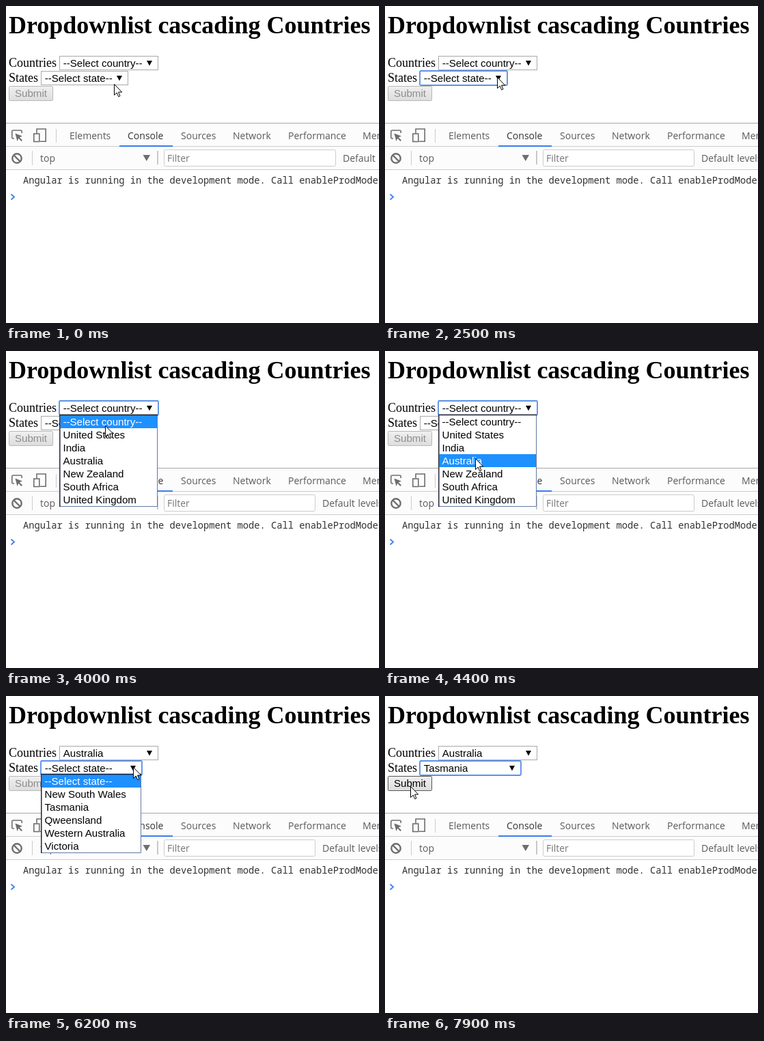
These frames come from a looping animation (546 px wide and 464 px high, 8000 ms). An HTML page:

```html
<!DOCTYPE html>
<html lang="en">
<head>
<meta charset="utf-8">
<title>Cascading dropdowns</title>
<style>
html, body { margin: 0; width: 100%; height: 100%; overflow: hidden; background: #fff; }
svg { display: block; width: 546px; height: 464px; }
text { white-space: pre; }
.serif { font: 18px "Liberation Serif", serif; }
.title { font: bold 36px "Liberation Serif", serif; }
.form { font: 15.1px "Liberation Sans", sans-serif; }
.tool { font: 14px "Open Sans", sans-serif; fill: #5a5a5a; word-spacing: 1px; }
.log { font: 13.75px "Noto Sans Mono", monospace; fill: #303030; }
.line { fill: none; stroke: #ccc; }
.icon { fill: none; stroke: #6e6e6e; stroke-width: 1.6; }
.bold { stroke-width: 2.4; }
</style>
</head>
<body>
<svg viewBox="0 0 546 464">
  <defs>
    <linearGradient id="face" x2="0" y2="1">
      <stop offset="0" stop-color="#f0f0f0"/>
      <stop offset="1" stop-color="#ddd"/>
    </linearGradient>
  </defs>
  <rect width="546" height="464" fill="#fff"/>
  <text class="title" x="4" y="40">Dropdownlist cascading Countries</text>
  <text class="serif" x="4" y="89">Countries</text>
  <text class="serif" x="4" y="111">States</text>

  <rect id="button" x="4.5" y="117.5" width="64" height="21" rx="1" fill="url(#face)"/>
  <text id="submit" class="form" x="13" y="133">Submit</text>

  <rect y="171" width="546" height="69" fill="#fcfcfc"/>
  <path class="line" d="M0 205.5H546M0 239.5H546M73.5 180V200M38.5 212V233"/>
  <path d="M0 171.5H546" stroke="#a8a8a8"/>
  <path d="M222 212V232" stroke="#bbb" stroke-width="1.6"/>
  <rect x="166" y="204" width="78" height="2" fill="#3b7ded"/>
  <g id="tabs"></g>

  <path class="icon" d="M12 194H10.500Q8.800 194 8.800 192.500V183.500Q8.800 182 10.500 182H21.500Q23.200 182 23.200 183.500V186"/>
  <path d="M13.500 186.500L24 190.500 19.800 192.300 24 196.500 22.500 198 18.300 193.800 16.500 198Z" fill="#6e6e6e"/>
  <path class="icon" d="M45 186V180H58.200V198.200H50"/>
  <rect class="icon" x="40.800" y="187" width="8" height="11.500"/>
  <circle class="icon bold" cx="16" cy="223" r="6.700"/>
  <path class="icon bold" d="M11.500 218.500L20.500 227.500"/>
  <text class="tool" x="50" y="228">top</text>
  <path d="M200.500 218H211L205.800 227Z" fill="#6e6e6e"/>
  <rect id="filter" x="231.500" y="210.500" height="24" rx="2" fill="#fff" stroke="#ccc"/>
  <text class="tool" x="236" y="228" style="fill:#757575">Filter</text>
  <text id="levels" class="tool" y="228">Default levels</text>

  <text class="log" x="25" y="260">Angular is running in the development mode. Call enableProdMode</text>
  <path d="M7.500 275.500L12 279.500 7.500 283.500" fill="none" stroke="#4a86ee" stroke-width="2"/>

  <g id="selects"></g>
  <g id="lists"></g>
  <path id="cursor" d="M.5 .5V16.500L4.200 13 6.700 18.700 9 17.700 6.500 12.100H11.700Z" fill="#fff" stroke="#000"/>
</svg>
<script>
const LOOP = 8000, STEP = 100, ROW = 19;
const $ = id => document.getElementById(id);

function add(parent, tag, attrs, text) {
  const el = document.createElementNS('http://www.w3.org/2000/svg', tag);
  set(el, attrs);
  if (text) el.textContent = text;
  return parent.appendChild(el);
}
function set(el, attrs) {
  for (const k in attrs) el.setAttribute(k, attrs[k]);
}

[[93, 'Elements'], [178, 'Console'], [256, 'Sources'], [332, 'Network'], [413, 'Performance'], [522, 'Memory']]
  .forEach(([x, name]) => add($('tabs'), 'text',
    { class: 'tool', x, y: 195, style: name === 'Console' ? 'fill:#333' : '' }, name));

function makeSelect(x, y) {
  const g = $('selects');
  const box = add(g, 'rect', { x: x + .5, y: y + .5, height: 20, fill: '#fff', stroke: '#a9a9a9' });
  const ring = add(g, 'rect', { x, y, height: 21, rx: 1.5, fill: 'none', stroke: '#5a92e6', 'stroke-width': 1.8 });
  const label = add(g, 'text', { class: 'form', x: x + 5.75, y: y + 16 });
  const arrow = add(g, 'path', { d: 'M0 0H8L4 7.500Z' });
  return (width, value, focus) => {
    set(box, { width: width - 1 });
    set(ring, { width });
    ring.style.display = focus ? '' : 'none';
    set(arrow, { transform: `translate(${x + width - 17} ${y + 7})` });
    label.textContent = value;
  };
}

function makeList(x, y, width, items) {
  const g = add($('lists'), 'g', {});
  const h = items.length * ROW + 2;
  add(g, 'rect', { x, y, width, height: h, fill: '#fff' });
  const bar = add(g, 'rect', { x: x + 1.5, width: width - 2.5, height: ROW, fill: '#1e90ff' });
  add(g, 'path', { d: `M${x + width - .5} ${y}v${h - .5}H${x}`, fill: 'none', stroke: '#6478a4' });
  add(g, 'path', { d: `M${x + .8} ${y + h}V${y + .5}H${x + width}`, fill: 'none', stroke: '#14182c', 'stroke-width': 1.4 });
  const rows = items.map((s, i) => add(g, 'text', { class: 'form', x: x + 5.5, y: y + 16 + i * ROW }, s));
  return (open, mouseY) => {
    g.style.display = open ? '' : 'none';
    const hot = Math.max(0, Math.min(items.length - 1, Math.floor((mouseY - y - 1) / ROW)));
    set(bar, { y: y + 1 + hot * ROW });
    rows.forEach((r, i) => set(r, { fill: i === hot ? '#fff' : '#000' }));
  };
}

const PICK_COUNTRY = '--Select country--', PICK_STATE = '--Select state--';
const country = makeSelect(78, 73), state = makeSelect(51, 95);
const countryList = makeList(78, 93, 144, [PICK_COUNTRY, 'United States', 'India', 'Australia',
  'New Zealand', 'South Africa', 'United Kingdom']);
const emptyList = makeList(51, 114, 128, [PICK_STATE]);
const stateList = makeList(51, 114, 147, [PICK_STATE, 'New South Wales', 'Tasmania', 'Qweensland',
  'Western Australia', 'Victoria']);

// time, x, y of the pointer tip
const PATH = [
  [0, 158, 114], [100, 164, 104], [2500, 164, 104], [2800, 195, 91], [2900, 195, 91],
  [3200, 208, 86], [3600, 208, 86], [4000, 145, 109], [4400, 132, 157], [5100, 132, 157],
  [5900, 186, 104], [6300, 186, 104], [7200, 111, 155], [7300, 111, 155], [7900, 37, 132], [8000, 37, 132]
];
function pointer(t) {
  const i = PATH.findIndex(p => p[0] > t);
  const [t0, x0, y0] = PATH[i - 1], [t1, x1, y1] = PATH[i];
  const k = (t - t0) / (t1 - t0);
  return [Math.round(x0 + (x1 - x0) * k), Math.round(y0 + (y1 - y0) * k)];
}

function draw(time) {
  const t = Math.floor(time % LOOP / STEP) * STEP;
  const during = (a, b) => t >= a && t < b;
  const [x, y] = pointer(t);
  const chosen = t >= 4800, ready = t >= 7400;
  const over = ready && x < 69 && y > 117;

  country(145, chosen ? 'Australia' : PICK_COUNTRY, during(3400, 6200));
  state(chosen ? 148 : 128, ready ? 'Tasmania' : PICK_STATE, during(100, 3400) || t >= 6200);
  countryList(during(3400, 4800), y);
  emptyList(during(100, 2500), y);
  stateList(during(6200, 7400), y);

  set($('button'), { stroke: over ? '#555' : ready ? '#999' : '#b8b8b8' });
  set($('submit'), { fill: ready ? '#000' : '#8c8c8c' });
  set($('filter'), { width: t < 100 ? 251 : 221 });
  set($('levels'), { x: t < 100 ? 493 : 463 });
  set($('cursor'), { transform: `translate(${x} ${y})` });
}

const start = performance.now();
function tick() {
  draw(performance.now() - start);
  requestAnimationFrame(tick);
}
tick();
</script>
</body>
</html>
```
